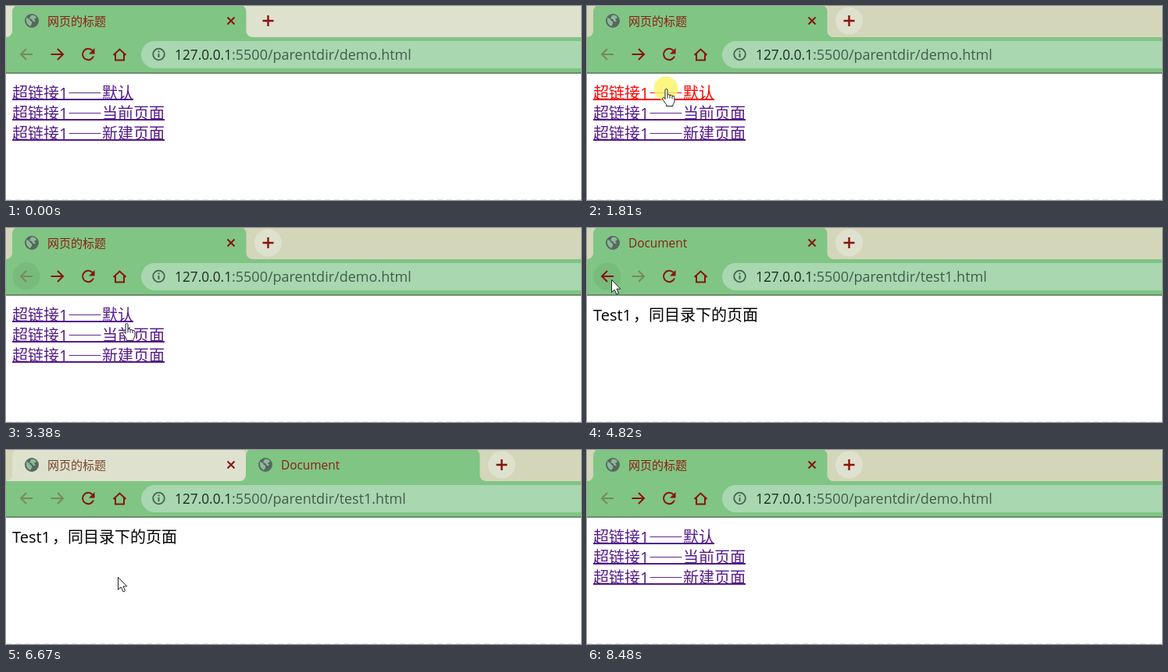
An HTML page for the animation above (9210 ms loop, 736 by 249 pixels).

```html
<!DOCTYPE html>
<html lang="zh-CN">
<head>
<meta charset="utf-8">
<title>Browser links</title>
<style>
html, body { margin: 0; width: 100%; height: 100%; overflow: hidden; background: #fff; }
svg { display: block; width: 736px; height: 249px; }
text { font-family: "Open Sans", "Noto Sans CJK SC", "Noto Sans CJK", sans-serif; white-space: pre; }
.title { font-size: 15px; fill: #8b1f12; }
.latin { font-size: 15.4px; }
.page { font-size: 20px; }
.icon { fill: none; stroke: #86150f; stroke-width: 2; }
</style>
</head>
<body>
<svg viewBox="0 0 736 249">
  <defs>
    <path id="tab" d="M0 40A8 8 0 0 0 8 32V7A8 8 0 0 1 16 -1H299.500A8 8 0 0 1 307.500 7V32A8 8 0 0 0 315.500 40Z"/>
    <g id="globe">
      <circle cx="33" cy="19" r="9" fill="#56695f"/>
      <path d="M26 15Q30 16 31 19Q34 20 33 23L31 26Q26 23 26 19ZM32 12Q37 11 39 15L36 17L38 20L35 20L33 17L30 16Z" fill="#8fb89a"/>
    </g>
    <path id="cross" class="icon" d="M283.500 14.500l9 9m0 -9l-9 9"/>
  </defs>
  <rect width="736" height="249" fill="#fff"/>
  <rect id="strip" width="736" height="40"/>
  <use id="tabA" href="#tab"/>
  <g id="tabB">
    <path id="shapeB" fill="#80c584"/>
    <g id="labelB" transform="translate(299 0)">
      <use href="#globe"/>
      <text class="title latin" x="53" y="25">Document</text>
    </g>
  </g>
  <use href="#globe"/>
  <text id="title" class="title" x="53" y="25"></text>
  <use href="#cross"/>
  <g id="plus">
    <circle id="plusBg" cx="335.5" cy="19" r="17.5" fill="#dfe1cf"/>
    <path class="icon" d="M328.500 19h14m-7 -7v14" style="stroke-width:2.4"/>
  </g>

  <rect y="40" width="736" height="46" fill="#80c584"/>
  <rect y="85" width="736" height="2" fill="#6a8e6d"/>
  <circle id="hover" cx="26" cy="62" r="17.5" fill="#78bb7c"/>
  <path id="back" class="icon" d="M34 62H19.500M26 55l-7 7l7 7"/>
  <path id="forward" class="icon" d="M57.500 62H72M66 55l7 7l-7 7"/>
  <path class="icon" d="M112 64.500A7.200 7.200 0 1 1 110.500 57"/>
  <path d="M113.500 54v7.500h-7.500z" fill="#86150f"/>
  <path class="icon" d="M137.500 63l8 -7.500l8 7.500M140 61.500v8h11v-8"/>
  <rect x="173" y="45" width="600" height="35" rx="17.5" fill="#a8d7b0"/>
  <circle cx="195.500" cy="62" r="7.300" fill="none" stroke="#466150" stroke-width="1.800"/>
  <path d="M195.500 61v5m0 -8.500v2" stroke="#466150" stroke-width="1.900"/>
  <text x="216" y="69" font-size="17.3" fill="#202b24">127.0.0.1</text>
  <text id="path" x="289" y="69" font-size="18" fill="#455a4c"></text>

  <g id="links"></g>
  <text id="test" class="page" x="8" y="118.5" fill="#000">Test1<tspan x="59">，</tspan><tspan x="79">同目录下的页面</tspan></text>
  <path d="M0 248.500H736" stroke="#e4e4e4" stroke-dasharray="7 5"/>

  <circle id="halo" r="15.5" fill="#fcf465" opacity=".82"/>
  <g id="cursor" fill="#fff" stroke="#222" stroke-linejoin="round">
    <path id="arrow" d="M.5 1.500V17.500l3.800 -3.300l2.700 6l2.600 -1.200l-2.600 -5.800h4.800Z"/>
    <path id="hand" d="M-1 13.500V2Q-1 .5 .5 .5T2 2V8Q4 6.800 5 8.500Q7.200 7.500 8 9.500Q11 8.800 11 11.500V15.500Q11 18.500 9 20.500V22.500H.5V20.500L-4 14Q-5 12 -3.300 11.200Q-2.300 11 -1 13.500ZM2 8V12.500M5 8.500V12.500M8 9.500V13"/>
  </g>
</svg>
<script>
const LOOP = 9210, STEP = 70;
const $ = id => document.getElementById(id);
const set = (id, name, value) => $(id).setAttribute(name, value);
const show = (id, on) => set(id, "visibility", on ? "visible" : "hidden");
const within = (t, spans) => spans.some(([a, b]) => t >= a && t < b);
const clamp = v => Math.max(0, Math.min(1, v));

const rows = [["默认", 163], ["当前页面", 203], ["新建页面", 203]];
$("links").innerHTML = rows.map(([tail, end], i) => {
  const y = 119 + i * 26;
  return `<g id="link${i}"><text class="page" x="8" y="${y}">超链接1` +
    `<tspan x="79" font-size="22" font-family="Noto Sans CJK SC, Noto Sans CJK, sans-serif">——</tspan>` +
    `<tspan x="123">${tail}</tspan></text>` +
    `<rect x="8" y="${y}" width="${end - 8}" height="2"/></g>`;
}).join("");

// start, end, x, y
const moves = [
  [260, 1170, 170, 121], [1240, 1590, 101, 106],
  [2090, 2630, 22, 62],
  [2970, 3380, 154, 122], [3390, 3530, 153, 130],
  [4010, 4610, 31, 65],
  [5100, 5590, 139, 150], [5660, 5940, 134, 165],
  [6670, 7500, 582, 5], [7510, 7580, 587, 11],
  [7930, 8480, 520, 255]
];
const clicks = [[1740, 1950], [2760, 2900], [3730, 3870], [4890, 5030], [6140, 6260], [7650, 7790]];
const pressed = [[1740, 2020], [3730, 3940], [6140, 6340]];
const testPage = [[2020, 2900], [3940, 5030], [6340, 7790]];
const backHover = [[2560, 3730], [4540, 5660]];

function pointer(t) {
  let x = 315, y = 250;
  for (const [a, b, tx, ty] of moves) {
    if (t < a) break;
    const p = t >= b ? 1 : clamp((Math.floor((t - a) / STEP) + 1) * STEP / (b - a));
    const e = p * p * (3 - 2 * p);
    x += (tx - x) * e;
    y += (ty - y) * e;
  }
  return [x, y];
}

function overLink(x, y) {
  const i = Math.floor((y - 98) / 26);
  return i >= 0 && i < 3 && x >= 8 && x <= rows[i][1];
}

function draw(t) {
  const focused = t >= 1740;
  const onTest = within(t, testPage);
  const newTab = t >= 6340 && t < 7790;
  const opened = Math.floor((t - 6340) / STEP) + 1;
  const closed = Math.floor((t - 7790) / STEP) + 1;
  const grow = t < 6340 ? 0 : newTab ? clamp(opened / 3) : clamp(1 - closed / 3);
  const w = 299 * grow;

  set("strip", "fill", focused ? "#d4d6ba" : "#dfe1cf");
  set("tabA", "fill", newTab ? "#dfe1cf" : "#80c584");
  show("tabB", w > 0);
  if (w > 0) {
    const r = 307.5 + w;
    set("shapeB", "d", `M299 40A8 8 0 0 0 307 32V7A8 8 0 0 1 315 -1H${r - 8}A8 8 0 0 1 ${r} 7V32A8 8 0 0 0 ${r + 8} 40Z`);
  }
  show("labelB", grow > .6);
  set("plus", "transform", `translate(${w} 0)`);
  show("plusBg", focused);

  const sameTab = onTest && !newTab;
  $("title").textContent = sameTab ? "Document" : "网页的标题";
  set("title", "class", sameTab ? "title latin" : "title");
  $("title").style.fill = newTab ? "#75442c" : "#8b1f12";
  $("path").textContent = ":5500/parentdir/" + (onTest ? "test1.html" : "demo.html");

  const off = "#778b58", on = "#86150f";
  $("back").style.stroke = sameTab ? on : off;
  $("forward").style.stroke = onTest ? off : on;
  show("hover", within(t, backHover));

  show("links", !onTest);
  show("test", onTest);
  pressed.forEach((span, i) => set("link" + i, "fill", within(t, [span]) ? "#ff0000" : "#551a8b"));

  const [x, y] = pointer(t);
  const visible = t >= 260 && t < 8480;
  const loading = t >= 6260 && t < 6340;
  const hand = !onTest && !loading && overLink(x, y);
  set("cursor", "transform", `translate(${x.toFixed(1)} ${y.toFixed(1)})`);
  show("arrow", visible && !hand);
  show("hand", visible && hand);
  set("halo", "cx", x);
  set("halo", "cy", y);
  show("halo", within(t, clicks));
}

const start = performance.now();
function tick() {
  draw((performance.now() - start) % LOOP);
  requestAnimationFrame(tick);
}
tick();
</script>
</body>
</html>
```
